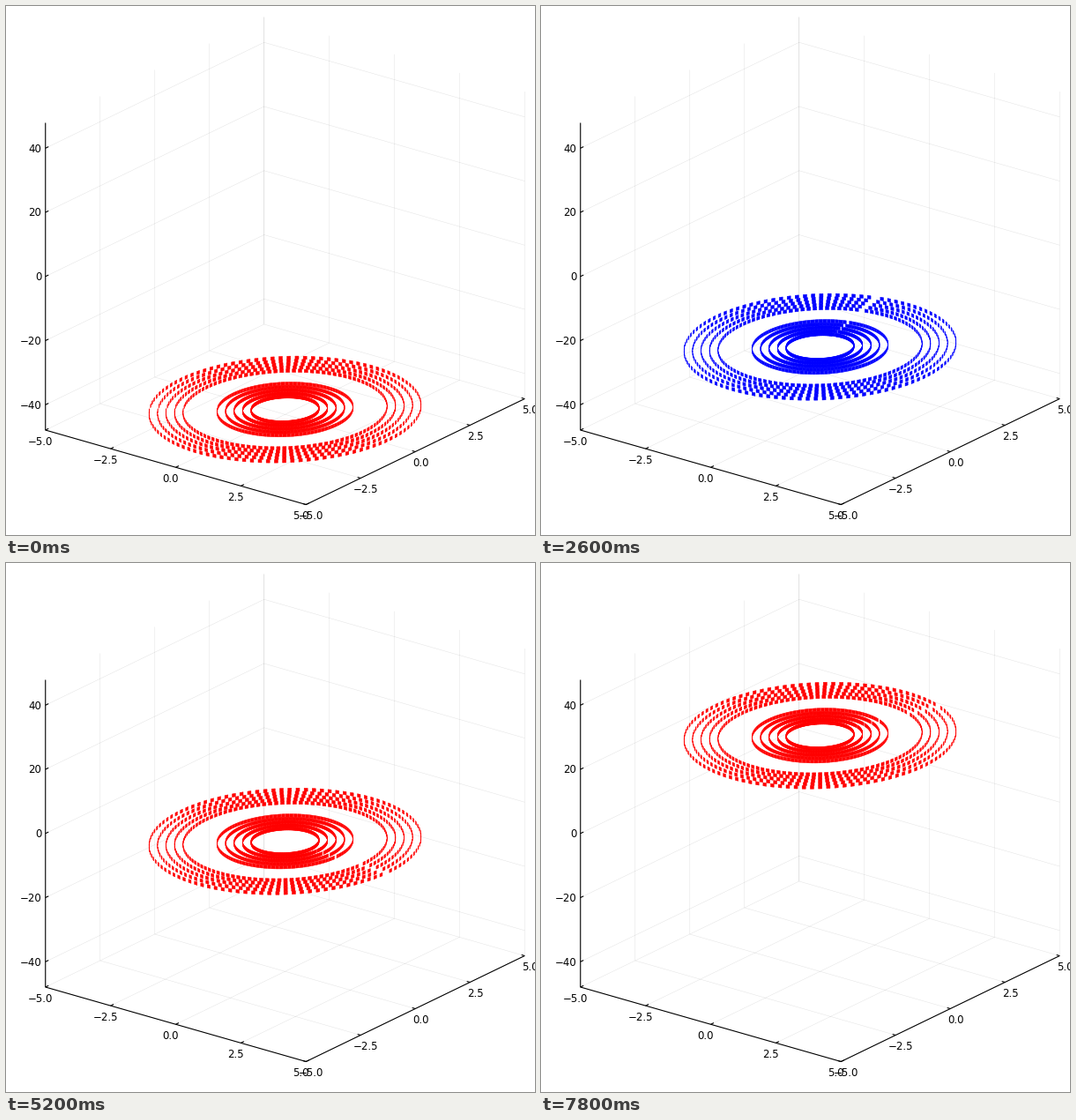
Recreate the animation shown at these times as a matplotlib script. Size 600 by 600 pixels, loop 8000 ms.

```python
import numpy as np
import matplotlib.pyplot as plt
from matplotlib.animation import FuncAnimation
from matplotlib.collections import LineCollection, PolyCollection

SIZE, DPI = 600, 100
PX = 72 / DPI                      # points per pixel
FRAMES, INTERVAL = 40, 200

# Oblique projection: screen pixels per data unit
CENTER = np.array([316.5, 306.0])
EX = np.array([29.55, 8.45])
EY = np.array([24.8, -12.0])
EZ = np.array([0.0, -3.6375])
FLOOR_Y = 157.25                   # floor centre below the z = 0 label level
TOP, BOTTOM = 47.9, -47.9
LIM = 5.0

RADII = np.concatenate([np.arange(1, 2.01, 0.25), np.arange(3, 4.01, 0.25)])
PITCH, TILES = 0.06, 104           # angle between plates, plates per ring
TILE_W, TILE_H = 0.105, 1.0        # plate size, the same on every ring
LAYER, INNER_Z = 1.5, 7.5          # layer spacing, and height of the innermost layers
HALF = 27                          # layers on each side of the middle gap
TWIST = np.radians(36)

xy_ticks = np.arange(-5, 5.1, 2.5)
z_ticks = np.arange(-40, 41, 20)


def project(x, y, z):
    """Data coordinates to screen pixels (y down)."""
    x, y, z = np.broadcast_arrays(x, y, z)
    p = x[..., None] * EX + y[..., None] * EY + (z - BOTTOM)[..., None] * EZ
    return p + CENTER + [0, FLOOR_Y]


def path(*points):
    return np.array([project(*np.array(p, float)) for p in points])


fig = plt.figure(figsize=(SIZE / DPI, SIZE / DPI), dpi=DPI, facecolor="white")
ax = fig.add_axes([0, 0, 1, 1])
ax.set_xlim(0, SIZE)
ax.set_ylim(SIZE, 0)
ax.axis("off")


def draw_grid():
    lines = []
    for t in xy_ticks:
        lines.append(path((t, -LIM, BOTTOM), (t, LIM, BOTTOM), (t, LIM, TOP)))
        lines.append(path((LIM, t, BOTTOM), (-LIM, t, BOTTOM), (-LIM, t, TOP)))
    for t in z_ticks:
        lines.append(path((-LIM, -LIM, t), (-LIM, LIM, t), (LIM, LIM, t)))
    ax.add_collection(LineCollection(lines, colors=[(0, 0, 0, 0.1)],
                                     linewidths=0.55 * PX, zorder=1))


def label(value, pos, ha="center"):
    text = value.replace("-", "\u2212")
    ax.text(*pos, text, ha=ha, va="baseline", fontsize=11.8 * PX,
            family="DejaVu Sans", color="black", zorder=4)


def draw_axes():
    frame = path((-LIM, -LIM, TOP), (-LIM, -LIM, BOTTOM),
                 (LIM, -LIM, BOTTOM), (LIM, LIM, BOTTOM))
    lines = [frame]
    for t in xy_ticks:
        px = project(t, -LIM, BOTTOM)
        py = project(LIM, t, BOTTOM)
        lines += [np.array([px, px + EY * 0.14]), np.array([py, py - EX * 0.12])]
        label(f"{t:.1f}", px + [-5.9, 16.7])
        label(f"{t:.1f}", py + [5.8, 16.7])
    for t in z_ticks:
        pz = project(-LIM, -LIM, t)
        lines.append(np.array([pz, pz + EY * 0.14]))
        label(f"{t:d}", pz + [-4.6, 4.3], ha="right")
    ax.add_collection(LineCollection(lines, colors="black",
                                     linewidths=1.1 * PX, zorder=3))


def layer_z(i):
    """Height of layer i, skipping the empty middle."""
    if i < HALF:
        return -INNER_Z - LAYER * (HALF - 1 - i)
    return INNER_Z + LAYER * (i - HALF)


def tiles(z):
    """Upright plates on all rings; each layer is twisted against the next."""
    k = round((abs(z) - INNER_Z) / LAYER)
    mid = k * TWIST + PITCH * (np.arange(TILES) + 0.25)
    r = RADII[:, None, None]
    a = mid[:, None] + np.array([-0.5, 0.5, 0.5, -0.5]) * TILE_W / r
    h = np.array([-0.5, -0.5, 0.5, 0.5]) * TILE_H
    quads = project(r * np.cos(a), r * np.sin(a), z + 0.15 + h)
    return quads.reshape(-1, 4, 2)


draw_grid()
draw_axes()
rings = PolyCollection([], linewidths=0.5 * PX, zorder=5)
ax.add_collection(rings, autolim=False)


def update(i):
    z = layer_z(i)
    row = round((z - layer_z(0)) / LAYER)
    rings.set_verts(tiles(z))
    rings.set_color("blue" if row % 2 else "red")
    return [rings]


anim = FuncAnimation(fig, update, frames=FRAMES, interval=INTERVAL,
                     init_func=lambda: update(0), repeat=True, repeat_delay=0)
plt.show()
```
